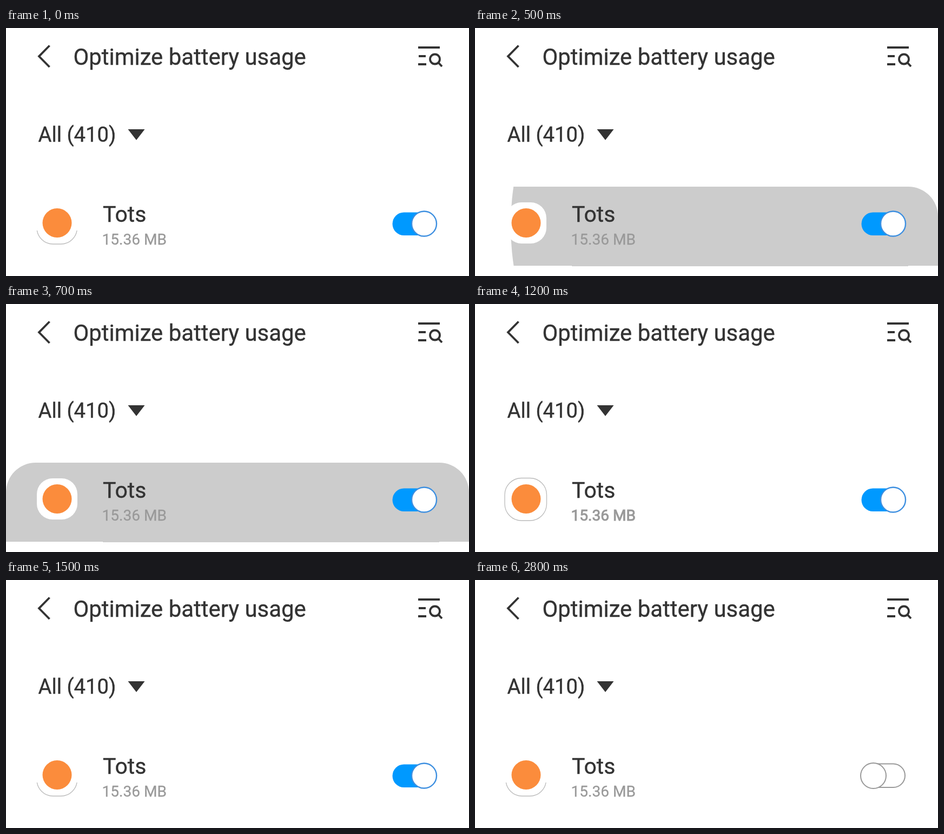
Animation of 856 by 458 pixels, one loop 3.9 s. Source, as an HTML page:

```html
<!DOCTYPE html>
<html lang="en">
<head>
<meta charset="utf-8">
<title>Battery usage switch</title>
<style>
  html, body { margin: 0; width: 100%; height: 100%; overflow: hidden; background: #fff; }
  svg { display: block; width: 856px; height: 458px; font-family: Roboto, sans-serif; fill: #333; }
  .line { fill: none; stroke: #333; stroke-width: 3.8; }
  .dark { stroke: #333; stroke-width: .4; }
  .edge { fill: none; stroke: #bbb; stroke-width: 1.3; }
  .off { fill: #fff; stroke: #999; stroke-width: 2; }
</style>
</head>
<body>
<svg viewBox="0 0 856 458">
  <defs>
    <clipPath id="card">
      <path d="M0 439V348A55 55 0 0 1 55 293H801A55 55 0 0 1 856 348V439H801V440H179V439Z"/>
    </clipPath>
    <clipPath id="lower"><path d="M50 374H140V405H50Z"/></clipPath>
  </defs>

  <path class="line" d="M80.5 32.5L61 52.3L80.5 72"/>
  <text class="dark" x="124.5" y="68" font-size="41.9">Optimize battery usage</text>
  <path class="line" d="M762 36H802M763 52H776M762 67H777M799.5 64L806 71"/>
  <circle class="line" cx="793" cy="57.5" r="9"/>
  <text class="dark" x="59.5" y="210" font-size="38.2">All (410)</text>
  <path d="M225.5 187H256.5L241 207Z"/>

  <circle id="ripple" cx="566" cy="365" r="0" fill="#ccc" clip-path="url(#card)"/>

  <rect x="57" y="322" width="75" height="76" rx="29" fill="#fff"/>
  <rect id="fullEdge" class="edge" x="55" y="321.5" width="77.5" height="78.5" rx="31"/>
  <rect id="lowEdge" class="edge" x="57" y="323" width="74.5" height="76" rx="30" clip-path="url(#lower)"/>
  <circle cx="94.5" cy="360" r="27" fill="#fb8c3c"/>

  <text class="dark" x="179" y="358" font-size="41">Tots</text>
  <text id="size" x="177.5" y="400" font-size="28.1" fill="#999" stroke="#999" stroke-width=".3">15.36 MB</text>

  <g id="on">
    <rect x="714.5" y="340.5" width="82" height="42.5" rx="21.2" fill="#09f"/>
    <circle cx="773" cy="361.5" r="23" fill="#fff" stroke="#3d8fe0" stroke-width="2.4"/>
  </g>
  <g id="off" class="off">
    <rect x="714" y="339.5" width="81" height="43.5" rx="21.7"/>
    <circle cx="736.5" cy="361.5" r="23.5"/>
  </g>
</svg>
<script>
  const LOOP = 3900;
  const $ = id => document.getElementById(id);
  const show = (id, on) => $(id).setAttribute("visibility", on ? "visible" : "hidden");

  function draw(now) {
    const t = now % LOOP;
    const pressed = t >= 500 && t < 1200;
    const released = t >= 1200 && t < 1300;
    // The ripple first stops short of the left edge, then fills the row.
    $("ripple").setAttribute("r", pressed ? (t < 600 ? 500 : 700) : 0);
    $("size").setAttribute("stroke-width", released ? 1 : .3);
    show("fullEdge", released);
    show("lowEdge", !pressed && !released);
    show("on", t < 2800);
    show("off", t >= 2800);
  }

  const start = performance.now();
  function tick() {
    draw(performance.now() - start);
    requestAnimationFrame(tick);
  }
  tick();
</script>
</body>
</html>
```
